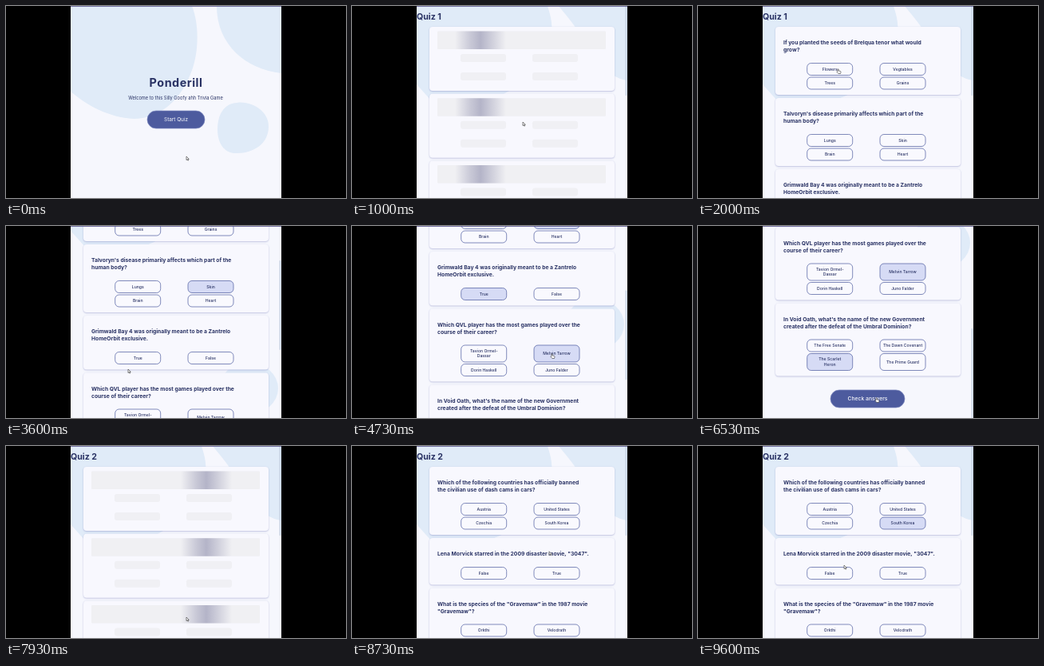
An HTML page with a canvas for the animation above (9670 ms loop, 426 by 240 pixels).

```html
<!DOCTYPE html>
<html lang="en">
<head>
<meta charset="utf-8">
<title>Trivia quiz</title>
<style>
html, body { margin: 0; width: 100%; height: 100%; overflow: hidden; background: #000; }
canvas { display: block; width: 426px; height: 240px; }
</style>
</head>
<body>
<canvas></canvas>
<script>
const canvas = document.querySelector('canvas');
const ctx = canvas.getContext('2d');
const ratio = window.devicePixelRatio || 1;
canvas.width = 426 * ratio;
canvas.height = 240 * ratio;

const LOOP = 9670, FPS = 15, PAGE_HEIGHT = 514;
const INK = '#293264', BLUE = '#4d5b9e', PAPER = '#f6f7fd', BLOB = '#e0ebf8';

// Options are listed row by row; "picked" is the chosen index, "at" its click time.
const quizzes = [
  [
    { ask: 'If you planted the seeds of Brelqua tenor what would\ngrow?',
      options: ['Flowers', 'Vegtables', 'Trees', 'Grains'], picked: 0, at: 2100 },
    { ask: "Talvoryn's disease primarily affects which part of the\nhuman body?",
      options: ['Lungs', 'Skin', 'Brain', 'Heart'], picked: 1, at: 2750 },
    { ask: 'Grimwald Bay 4 was originally meant to be a Zantrelo\nHomeOrbit exclusive.',
      options: ['True', 'False'], picked: 0, at: 3850 },
    { ask: 'Which QVL player has the most games played over the\ncourse of their career?',
      options: ['Tavion Ormel-\nDassar', 'Melvin Tarrow', 'Dorin Haskell', 'Juno Falder'], picked: 1, at: 4680 },
    { ask: "In Void Oath, what's the name of the new Government\ncreated after the defeat of the Umbral Dominion?",
      options: ['The Free Senate', 'The Dawn Covenant', 'The Scarlet\nHeron', 'The Prime Guard'], picked: 2, at: 5850 }
  ],
  [
    { ask: 'Which of the following countries has officially banned\nthe civilian use of dash cams in cars?',
      options: ['Austria', 'United States', 'Czechia', 'South Korea'], picked: 3, at: 9050 },
    { ask: 'Lena Morvick starred in the 2009 disaster movie, "3047".',
      options: ['False', 'True'] },
    { ask: 'What is the species of the "Gravemaw" in the 1987 movie\n"Gravemaw"?',
      options: ['Orkthi', 'Velodrath'] }
  ]
];

// Each key: time, then values.
const cursorKeys = [
  [0, 226, 188], [550, 214, 145], [1500, 214, 145], [1950, 175, 79], [2250, 175, 79],
  [2680, 256, 168], [2900, 256, 168], [3600, 153, 179], [3800, 165, 165], [4050, 165, 165],
  [4600, 250, 160], [4900, 250, 160], [5750, 165, 170], [5950, 165, 170], [6450, 223, 215],
  [7900, 226, 214], [8350, 226, 214], [8950, 256, 97], [9150, 256, 97], [9600, 183, 149]
];
const scrollKeys = [[0, 0], [2900, 0], [3400, 92], [4000, 92], [4400, 172], [4850, 172], [5400, 274]];

function tween(keys, time) {
  const next = keys.findIndex(key => key[0] > time);
  if (next < 0) return keys[keys.length - 1].slice(1);
  const a = keys[next - 1], b = keys[next];
  const p = (time - a[0]) / (b[0] - a[0]), eased = p * p * (3 - 2 * p);
  return a.slice(1).map((v, i) => v + (b[i + 1] - v) * eased);
}

function text(string, x, y, size, weight = 400, align = 'center', lead = 9, color = INK) {
  ctx.font = `${weight} ${size}px Inter, sans-serif`;
  ctx.textAlign = align;
  ctx.textBaseline = 'middle';
  ctx.fillStyle = color;
  string.split('\n').forEach((line, i) => ctx.fillText(line, x, y + i * lead));
}

function box(x, y, w, h, radius, fill, stroke, width = 0.7) {
  ctx.beginPath();
  ctx.roundRect(x, y, w, h, radius);
  ctx.fillStyle = fill;
  ctx.fill();
  if (!stroke) return;
  ctx.strokeStyle = stroke;
  ctx.lineWidth = width;
  ctx.stroke();
}

function blob(path) {
  ctx.fillStyle = BLOB;
  ctx.fill(new Path2D(path));
}

function card(y, h) {
  ctx.save();
  ctx.shadowColor = 'rgba(90, 95, 170, .4)';
  ctx.shadowBlur = 2 * ratio;
  ctx.shadowOffsetY = 0.7 * ratio;
  box(97, y, 232, h, 4, '#f8f8fe');
  ctx.restore();
}

let hot = [];   // clickable areas of the current picture

function pill(label, x, y, w, size, weight) {
  box(x, y, w, 22, 11, BLUE, '#7d88bf');
  text(label, x + w / 2, y + 11, size, weight, 'center', 9, '#f5f7fb');
  hot.push([x, y, w, 22]);
}

function drawStart() {
  blob('M81 0H233C243 25 242 64 229 90C216 119 192 141 160 141C128 139 103 125 81 107Z');
  blob('M264 0C264 48 300 79 345 84V0Z');
  blob('M289 121C309 118 330 133 329 151C329 172 310 184 290 184C273 185 265 171 265 154C265 136 273 122 289 121Z');
  ctx.letterSpacing = '0.5px';
  text('Ponderill', 213, 97, 14.4, 700);
  ctx.letterSpacing = '0px';
  text('Welcome to this Silly Goofy ahh Trivia Game', 212.5, 115.5, 5.7);
  pill('Start Quiz', 177, 131, 72, 6.4, 400);
}

function drawPageBackground(number) {
  blob('M81 0H245C248 10 252 20 250 40C230 100 170 135 100 119L81 98Z');
  blob('M259 0C272 16 280 25 292 45C310 78 329 91 345 93V0Z');
  ctx.beginPath();
  ctx.ellipse(304, 295, 37, 32, 0, 0, 7);
  ctx.fill();
  text('Quiz ' + number, 81, 13.7, 10.6, 700, 'left');
}

function drawQuiz(questions, time, scroll) {
  let top = 26;
  for (const { ask, options, picked, at } of questions) {
    const rows = [];
    let y = top + 27.5 + 9 * ask.split('\n').length;
    for (let i = 0; i < options.length; i += 2) {
      const pair = options.slice(i, i + 2);
      const h = pair.some(label => label.includes('\n')) ? 21 : 15;
      rows.push({ pair, y, h, first: i });
      y += h + 2.5;
    }
    const bottom = y + 4.5;
    card(top, bottom - top);
    text(ask, 107, top + 20.3, 6.75, 700, 'left');
    for (const { pair, y, h, first } of rows) {
      pair.forEach((label, i) => {
        const x = 136.7 + 91.3 * i, chosen = first + i === picked && time >= at;
        box(x, y, 57, h, 5, chosen ? '#d6dbf5' : '#f9f9fe', BLUE);
        const shift = label.includes('\n') ? -3.2 : 0;
        text(label, x + 28.5, y + h / 2 + shift, 5.1, 500, 'center', 6.4);
        hot.push([x, y - scroll, 57, h]);
      });
    }
    top = bottom + 4;
  }
  if (questions.length === 5) {
    pill('Check answers', 166, 479, 93, 6.8, 500);
    hot[hot.length - 1][1] -= scroll;
  }
}

function drawSkeleton(time, start) {
  const center = 107 + (time - start) * 0.27 % 270;
  const shine = ctx.createLinearGradient(center - 32, 0, center + 32, 0);
  [[0, 0], [0.3, 0.65], [0.5, 1], [0.7, 0.6], [1, 0]].forEach(([stop, alpha]) =>
    shine.addColorStop(stop, `rgba(180, 180, 200, ${alpha})`));
  for (let y = 26; y < 240; y += 83.7) {
    card(y, 80);
    box(107, y + 5.5, 211, 22.5, 1, '#f0f0f3');
    box(107, y + 5.5, 211, 22.5, 1, shine);
    for (const x of [136, 226])
      for (const dy of [34, 57]) box(x, y + dy, 57, 10, 3, '#f0f0f4');
  }
}

function drawCursor(x, y) {
  const over = hot.some(([l, t, w, h]) => x >= l && x <= l + w && y >= t - 2 && y <= t + h);
  const shape = over
    ? 'M0 0Q.8-.6 1.2.2V2L3.5 2.5Q4.2 2.8 4 3.6L3.5 5.5H.8L-1 3.4Q-.8 2.6 0 3.1Z'
    : 'M0 0V4.6L1.1 3.6L1.9 5.2L2.7 4.8L1.9 3.3H3.3Z';
  ctx.save();
  ctx.translate(x, y);
  const path = new Path2D(shape);
  ctx.fillStyle = '#fff';
  ctx.fill(path);
  ctx.strokeStyle = '#333';
  ctx.lineWidth = 0.6;
  ctx.stroke(path);
  ctx.restore();
}

function draw(time) {
  const started = time >= 800, second = time >= 7350;
  const scroll = second ? 0 : tween(scrollKeys, time)[0];
  hot = [];
  ctx.setTransform(ratio, 0, 0, ratio, 0, 0);
  ctx.fillStyle = '#000';
  ctx.fillRect(0, 0, 426, 240);
  ctx.save();
  ctx.beginPath();
  ctx.rect(81, 0, 264, 240);
  ctx.clip();
  ctx.fillStyle = PAPER;
  ctx.fillRect(81, 0, 264, 240);

  if (!started) drawStart();
  else {
    ctx.save();
    ctx.translate(0, -scroll);
    drawPageBackground(second ? 2 : 1);
    if (time < 1500) drawSkeleton(time, 800);
    else if (second && time < 8350) drawSkeleton(time, 7400);
    else drawQuiz(quizzes[second ? 1 : 0], time, scroll);
    ctx.restore();
    const scale = 240 / PAGE_HEIGHT;
    box(342.6, scroll * scale, 1.8, 240 * scale, 1, '#c9d5e6');
  }
  ctx.fillStyle = '#5a5690';
  ctx.fillRect(81, 0, 264, 0.8);
  drawCursor(...tween(cursorKeys, time));
  ctx.restore();
}

const origin = performance.now();
function frame() {
  const time = (performance.now() - origin) % LOOP;
  draw(Math.floor(time * FPS / 1000 + 0.05) * 1000 / FPS);
  requestAnimationFrame(frame);
}
frame();
</script>
</body>
</html>
```
